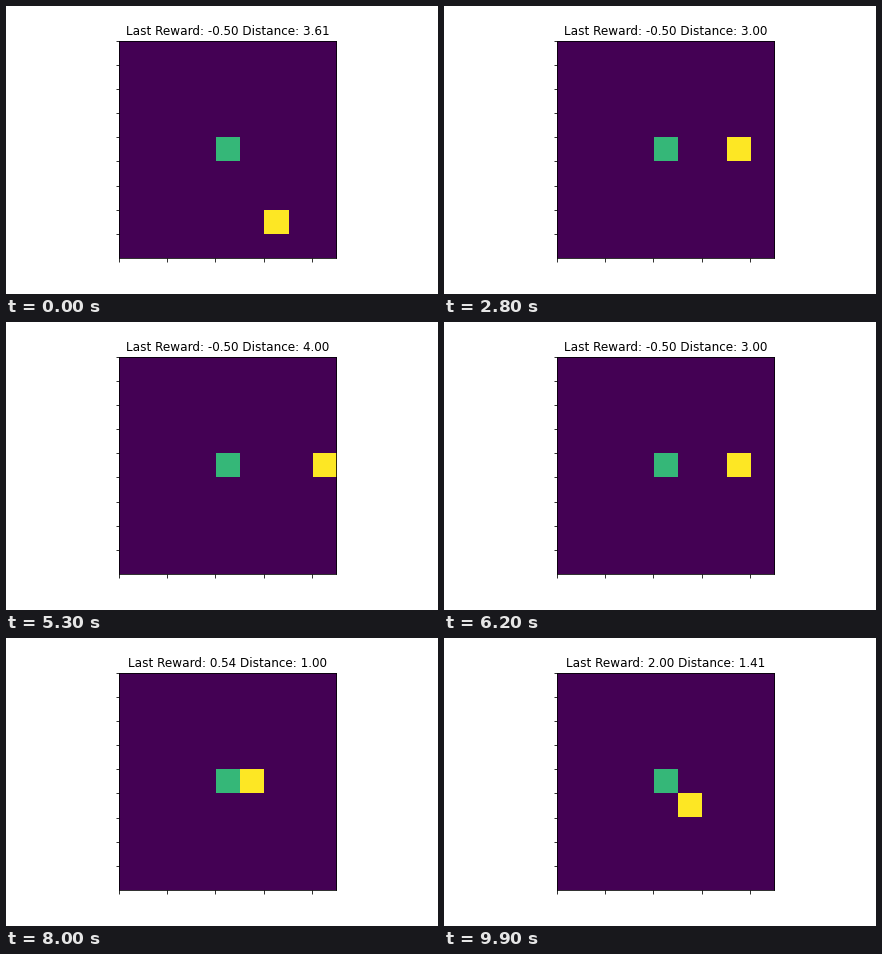
Animation, 432 px wide and 288 px high, one loop 10 s. Source, as a matplotlib script:

```python
import numpy as np
import matplotlib.pyplot as plt
from matplotlib.animation import FuncAnimation

SIZE, STEPS = 9, 100
GOAL = (4, 4)
AGENT_VALUE, GOAL_VALUE = 3, 2
MOVES = {"L": (-1, 0), "R": (1, 0), "U": (0, -1), "D": (0, 1)}

# Approach, hover on the right with two detours, then settle by the goal.
ROUTE = ("RUUUR" + "LR" * 12 + "DU" + "LR" * 4 + "DU" + "LR" * 13
         + "LLLD" + "UD" * 14)


def walk(start, route):
    cells = [start]
    for step in route:
        dx, dy = MOVES[step]
        x, y = cells[-1]
        cells.append((x + dx, y + dy))
    return cells


def reward(dist):
    if dist >= 2:
        return -0.5
    return 2.0 if dist > 1 else 0.54


path = walk((6, 7), ROUTE)

plt.rcParams["font.family"] = "DejaVu Sans"
fig, ax = plt.subplots(figsize=(6, 4), dpi=72)
fig.subplots_adjust(left=0.125, right=0.9, bottom=0.125, top=0.88)
image = ax.imshow(np.zeros((SIZE, SIZE)), cmap="viridis", vmin=0,
                  vmax=AGENT_VALUE, interpolation="nearest")
ax.set_xticks(np.arange(-0.5, SIZE - 1, 2))
ax.set_yticks(np.arange(-0.5, SIZE - 1, 1))
ax.tick_params(labelbottom=False, labelleft=False)
title = ax.set_title("", fontsize=12)


def update(i):
    x, y = path[i]
    dist = np.hypot(x - GOAL[0], y - GOAL[1])
    grid = np.zeros((SIZE, SIZE))
    grid[GOAL[1], GOAL[0]] = GOAL_VALUE
    grid[y, x] = AGENT_VALUE
    image.set_data(grid)
    title.set_text(f"Last Reward: {reward(dist):.2f} Distance: {dist:.2f}")
    return image, title


anim = FuncAnimation(fig, update, frames=STEPS, interval=100,
                     repeat=True, repeat_delay=0)
plt.show()
```
